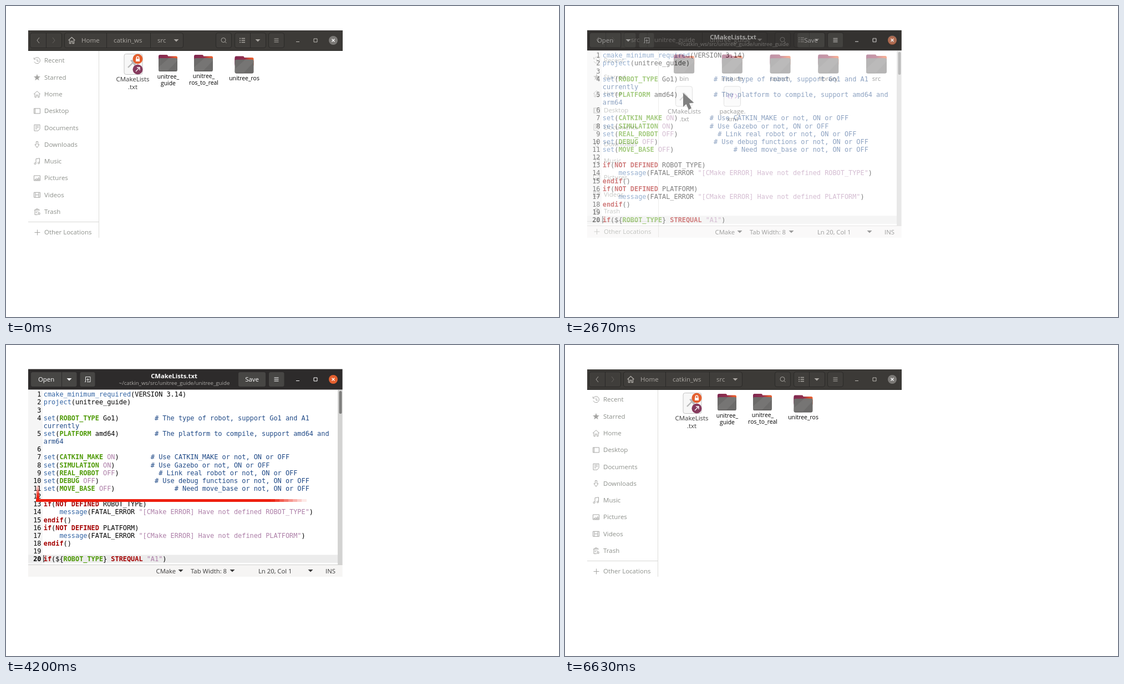
Recreate the animation shown at these times as an HTML page with a canvas. Size 997 by 561 pixels, loop 6660 ms.

```html
<!DOCTYPE html>
<html lang="en">
<head>
<meta charset="utf-8">
<title>Editing CMakeLists.txt</title>
<style>
html, body { margin: 0; width: 100%; height: 100%; overflow: hidden; background: #fff; }
canvas { display: block; }
</style>
</head>
<body>
<canvas id="stage" width="997" height="561"></canvas>
<script>
const W = 997, H = 561, LOOP = 6660, STEP = 30;
const UI = '"Open Sans", "Noto Sans", sans-serif';
const MONO = '"DejaVu Sans Mono", "Noto Sans Mono", monospace';
const stage = document.getElementById('stage').getContext('2d');
let g = stage;

// ---------- drawing helpers ----------
function rect(x, y, w, h, color) {
  g.fillStyle = color;
  g.fillRect(x, y, w, h);
}
function box(x, y, w, h, r, fill, stroke) {
  g.beginPath();
  g.roundRect(x, y, w, h, r);
  if (fill) { g.fillStyle = fill; g.fill(); }
  if (stroke) { g.strokeStyle = stroke; g.lineWidth = 1; g.stroke(); }
}
function dot(x, y, r, color) {
  g.fillStyle = color;
  g.beginPath();
  g.arc(x, y, r, 0, 7);
  g.fill();
}
// Text whose capitals are centred on y.
function text(s, x, y, color, size = 11.5, align = 'left', weight = '') {
  g.font = `${weight} ${size}px ${UI}`;
  g.textAlign = align;
  g.fillStyle = color;
  g.fillText(s, x, y + size * 0.36);
}
function icon(x, y, d, color, fill, width = 1) {
  const path = new Path2D(d);
  g.save();
  g.translate(x, y);
  g.fillStyle = g.strokeStyle = color;
  g.lineWidth = width;
  fill ? g.fill(path) : g.stroke(path);
  g.restore();
}
const arrowDown = (x, y, color) => icon(x, y, 'M-4.5-2H4.5L0 2.5Z', color, true);
const CROSS = 'M-2.5-2.5 2.5 2.5M2.5-2.5-2.5 2.5';
const HOUSE = 'M-6 0 0-5.5 6 0M-4-1V5.5H-1.5V1.5H1.5V5.5H4V-1';
const MENU = 'M-4-3H4M-4 0H4M-4 3H4';

function windowButtons(y, color, close) {
  icon(526, y, 'M-3 2.5H3', color);
  icon(558, y, 'M-3-3H3V3H-3Z', color);
  dot(590, y, 8, close);
  icon(590, y, CROSS, '#fff', false, 1.3);
}

// ---------- file manager ----------
const PLACES = [
  ['Recent', 'M-4.5-3.5A5.5 5.5 0 1 1-5 2M0-3V1H3M-5.5-5.5V-2.5H-2.5'],
  ['Starred', 'M0-6 1.5-1.8 6-1.6 2.4 1.2 3.7 5.5 0 3-3.7 5.5-2.4 1.2-6-1.6-1.5-1.8Z', true],
  ['Home', HOUSE],
  ['Desktop', 'M-5.5-4.5H5.5V4.5H-5.5ZM-3.5-4.5V4.5'],
  ['Documents', 'M-5-5.5H5V2L2 5.5H-5ZM-3-3H3M-3-.5H3M-3 2H0'],
  ['Downloads', 'M-1.5-5.5H1.5V0H4L0 5.5-4 0H-1.5Z'],
  ['Music', 'M-2 3.5V-4.5L4.5-5.5V2.5M-5 4a1.5 1.5 0 1 0 3 0 1.5 1.5 0 1 0-3 0M1.5 3a1.5 1.5 0 1 0 3 0 1.5 1.5 0 1 0-3 0'],
  ['Pictures', 'M-5.5-4.5H5.5V4.5H-5.5ZM-4 3-1 0 1 2 3-1 4 3Z'],
  ['Videos', 'M-5.5-4.5H5.5V4.5H-5.5ZM-3-4.5V4.5M3-4.5V4.5M-3 0H3'],
  ['Trash', 'M-5-3H5M-2-3V-5H2V-3M-4-3V5.5H1M-1.5-1V3M1.5-1V1M2 2H5V5H2Z']
];

function buttonGroup(left, right, dividers, y) {
  box(left + .5, y - 13.5, right - left, 27, 3.5, '#403e3b', '#2b2a28');
  for (const x of dividers) rect(x, y - 13, 1, 26, '#2b2a28');
}

function fileManager(d, crumbs) {
  const y = 62 - d, gray = '#a9a6a1';
  rect(40, 44, 567, 37 - d, '#3c3a37');
  rect(40, 80 - d, 567, 1, '#2b2a28');
  buttonGroup(43, 100 + d, [72 + d], y);
  icon(58 + d, y, 'M2-5-2 0 2 5', gray);
  icon(86 + d, y, 'M-2-5 2 0-2 5', '#66635f');
  crumbs(y, gray);
  buttonGroup(378, 406, [], y);
  icon(392.5, y, 'M-4.5-.5a4 4 0 1 0 8 0 4 4 0 1 0-8 0M2.5 2.5 5 5', gray);
  buttonGroup(412, 468, [440], y);
  icon(426, y, 'M-5-3.5H-3M-5 0H-3M-5 3.5H-3M-1.5-3.5H5M-1.5 0H5M-1.5 3.5H5', gray, false, 1.6);
  arrowDown(454, y, gray);
  buttonGroup(473, 501, [], y);
  icon(487.5, y, MENU, gray);
  windowButtons(y, '#bbb8b3', '#7b7976');

  const step = 30.27 - d * .05, top = 98.3 - d * .7;
  PLACES.forEach(([name, path, fill], i) => {
    const row = top + i * step;
    icon(56 + d, row + .3, path, '#a5a5a3', fill);
    text(name, 69 + d, row, '#8d908b');
  });
  rect(40, 389 - d, 127 + d, 1, '#d8d8d6');
  icon(56.5 + d, 408.5 - d * 1.5, 'M-5 0H5M0-5V5', '#a5a5a3');
  text('Other Locations', 69 + d, 408 - d * 1.5, '#8d908b');
  rect(167 + d, 81 - d, 1, 337, '#dcdcda');
}

function folder(x, y, w, h) {
  const l = x - w / 2, t = y - h / 2;
  const back = g.createLinearGradient(l, 0, l + w, 0);
  back.addColorStop(0, '#7f2850');
  back.addColorStop(.5, '#92304e');
  back.addColorStop(.85, '#e2562f');
  back.addColorStop(1, '#e9602f');
  box(l, t, w * .5, h * .5, 2.5, back);
  box(l, t + 2.5, w, h * .5, 2.5, back);
  g.save();
  box(l, t + h * .2, w, h * .8, 3, '#6c6b6a');
  g.clip();
  icon(l, t, `M0 ${h}V${h * .75}L${w * .75} 0H${w}V${h * .35}L${w * .45} ${h}Z`, '#767574', true);
  rect(l, t + h - 1, w, 1, '#585756');
  g.restore();
}

function page(x, y, w, h) {
  box(x - w / 2 + .5, y - h / 2 + .5, w - 1, h - 1, 3.5, '#f7f7f7', '#c4c4c4');
}
function hammer(x, y) {
  icon(x, y, 'M-7 7 3-3', '#b9b9b9', false, 2.4);
  icon(x, y, 'M-3-6 1-7 8 0 5 4Z', '#b9b9b9', true);
}
function label(x, y, lines, color = '#3b3b3b', size = 11.5, gap = 13.5) {
  lines.forEach((s, i) => text(s, x, y + i * gap, color, size, 'center'));
}

function workspaceScene() {
  fileManager(0, (y, gray) => {
    buttonGroup(105, 319, [181, 260], y);
    icon(118.5, y, HOUSE, gray, false, 1.4);
    text('Home', 136, y, gray);
    text('catkin_ws', 194, y, gray);
    text('src', 273, y, gray);
    arrowDown(307, y, gray);
  });
  page(229.5, 105, 34, 38);
  hammer(227, 104);
  dot(237.5, 95.5, 9, '#e4602f');
  icon(237.5, 95.5, 'M-2.2 0V-2a2.2 2.2 0 0 1 4.4 0V0', '#fff', false, 1.4);
  rect(234, 95, 7, 5, '#fff');
  dot(237.5, 114.5, 9, '#863b5e');
  icon(237.5, 114.5, 'M-3.5 3.5 3-3M-1.5-3.5H3.5V1.5', '#fff', false, 1.3);
  label(228.5, 132, ['CMakeLists', '.txt']);
  folder(292, 103, 34, 30);
  folder(356, 103, 34, 30);
  folder(429.5, 106, 34, 31);
  label(292.5, 127, ['unitree_', 'guide'], '#000', 10.4, 12);
  label(356.5, 126.5, ['unitree_', 'ros_to_real'], '#000', 10.4, 12);
  label(429.5, 130.5, ['unitree_ros'], '#000', 10.4);
}

function packageScene() {
  fileManager(1, (y, gray) => {
    buttonGroup(106, 364, [148, 247], y);
    text('src', 119, y, gray);
    text('unitree_guide', 161, y, gray);
    text('unitree_guide', 261, y, gray);
    arrowDown(351, y, gray);
  });
  ['bin', 'include', 'launch', 'library', 'src'].forEach((name, i) => {
    const x = 214.7 + i * 86.7;
    folder(x, 104.5, 37, 34);
    label(x, 131, [name]);
  });
  page(214.5, 163, 31, 37);
  hammer(214, 163);
  label(215, 190, ['CMakeLists', '.txt']);
  page(301.5, 163, 31, 37);
  icon(301.5, 162.5, 'M-5-4-9 0-5 4M5-4 9 0 5 4M1.8-5-1.8 5', '#b48fd0', false, 1.4);
  label(302, 190, ['package.', 'xml']);
}

// ---------- editor ----------
const CODE = `cmake_minimum_required(VERSION 3.14)
project(unitree_guide)

set(ROBOT_TYPE Go1)         # The type of robot, support Go1 and A1
currently
set(PLATFORM amd64)         # The platform to compile, support amd64 and
arm64

set(CATKIN_MAKE ON)        # Use CATKIN_MAKE or not, ON or OFF
set(SIMULATION ON)         # Use Gazebo or not, ON or OFF
set(REAL_ROBOT OFF)          # Link real robot or not, ON or OFF
set(DEBUG OFF)              # Use debug functions or not, ON or OFF
set(MOVE_BASE OFF)               # Need move_base or not, ON or OFF

if(NOT DEFINED ROBOT_TYPE)
    message(FATAL_ERROR "[CMake ERROR] Have not defined ROBOT_TYPE")
endif()
if(NOT DEFINED PLATFORM)
    message(FATAL_ERROR "[CMake ERROR] Have not defined PLATFORM")
endif()

if(\${ROBOT_TYPE} STREQUAL "A1")
    add_definitions(-DROBOT_TYPE_A1)`.split('\n');
const WRAPPED = /^(currently|arm64)$/;
// Groups: comment, value, variable, keyword, function.
const TOKENS = /(#.*|^currently|^arm64)|("[^"]*"|\b(?:ON|OFF)\b)|((?<=set\(|\{)\w+)|(\b(?:if|endif|NOT|DEFINED|STREQUAL)\b)|(\b(?:cmake_minimum_required|project|set|message|add_definitions)\b)|./g;
const COLORS = ['#204a87', '#ad7fa8', '#4e9a06', '#a40000', '#3465a4'];

function codeLines() {
  const size = 11.88, regular = `${size}px ${MONO}`, bold = 'bold ' + regular;
  let number = 0;
  g.save();
  g.beginPath();
  g.rect(40, 81, 558, 314);
  g.clip();
  CODE.forEach((line, i) => {
    const y = 93.2 + i * 14.15;
    if (!WRAPPED.test(line)) {
      number++;
      g.font = number === 20 ? bold : regular;
      g.fillStyle = '#000';
      g.textAlign = 'right';
      g.fillText(number, 63.5, y);
    }
    g.textAlign = 'left';
    g.font = regular;
    const advance = g.measureText('0').width;
    for (const m of line.matchAll(TOKENS)) {
      const kind = m.slice(1).findIndex(Boolean);
      g.font = kind === 2 || kind === 3 ? bold : regular;
      g.fillStyle = COLORS[kind] || '#000';
      g.fillText(m[0], 67.8 + m.index * advance, y);
    }
  });
  g.restore();
}

function editorScene() {
  const button = (x, w) => box(x, 49, w, 26, 3, '#474644');
  rect(40, 43.5, 566.6, 37, '#2d2b2b');
  button(45, 82.5);
  rect(100, 49, 1, 26, '#2d2b2b');
  text('Open', 58, 62, '#fff', 11.4);
  arrowDown(114, 62, '#fff');
  button(133.5, 27);
  icon(147, 62, 'M-5 4.5H-3.5V-4.5H5V4.5H2M-1 4.5H2M.5-2V3M-2 .5H3', '#e8e8e8');
  text('CMakeLists.txt', 303, 56, '#fff', 11.3, 'center', 'bold');
  text('~/catkin_ws/src/unitree_guide/unitree_guide', 303.5, 68.5, '#a8a6a3', 9.7, 'center');
  button(419, 49);
  text('Save', 443.5, 62, '#fff', 11.3, 'center');
  button(474, 27.5);
  icon(487.5, 62, MENU, '#fff');
  windowButtons(62, '#fff', '#e4602f');

  rect(40, 81, 26, 315, '#f5f5f5');
  rect(40, 378.5, 558, 14.5, '#ececec');
  codeLines();
  rect(67.5, 379, 1, 13, '#000');
  rect(598, 81, 8.6, 315, '#d3d3d2');
  box(600.5, 83, 5, 41, 2.5, '#7e7e7d');

  rect(40, 396, 566.6, 22, '#f6f5f4');
  rect(40, 396, 566.6, 1, '#d0cfcd');
  const status = (s, x) => text(s, x, 407.5, '#3b3b3b', 11.3);
  status('CMake', 270.5);
  status('Tab Width: 8', 333);
  status('Ln 20, Col 1', 455);
  status('INS', 576);
  for (const x of [315, 408, 549]) arrowDown(x, 407, '#3b3b3b');
}

function render(scene) {
  const canvas = document.createElement('canvas');
  canvas.width = W;
  canvas.height = H;
  g = canvas.getContext('2d');
  rect(0, 0, W, H, '#fff');
  scene();
  g = stage;
  return canvas;
}
const workspace = render(workspaceScene);
const packageDir = render(packageScene);
const editor = render(editorScene);

// ---------- motion ----------
const clamp = v => Math.min(1, Math.max(0, v));
const progress = (t, from, to) => clamp((t - from) / (to - from));
function fade(t, from, to) {
  const p = progress(t, from, to);
  return p * p * (3 - 2 * p);
}
function show(scene, alpha) {
  if (!alpha) return;
  g.globalAlpha = alpha;
  g.drawImage(scene, 0, 0);
  g.globalAlpha = 1;
}

const POINTER = 'M0 0V25L5.5 20 10 30 15 27.5 11 18.5 19.5 17.5Z';
function pointer(t) {
  if (t < 630) return;
  const enter = (1 - progress(t, 630, 1313)) ** 1.25;
  const move = 1 - (1 - progress(t, 1800, 2500)) ** 1.8;
  icon(297 + 350 * enter - 84 * move, 101 + 455 * enter + 56 * move, POINTER, '#000', true);
}

// Frame sides in drawing order: start point and direction.
const SIDES = [[574, 115, -520, 0], [55, 117, 0, 166], [54, 278, 520, 0], [569, 283, 0, -166]];
const SOFT = .125, STRIPS = 64, THICK = 5;
const wipe = (p, u) => clamp((clamp(p) * (1 + SOFT) - u) / SOFT);

// Each side wipes in, then wipes out while the next one wipes in.
function redFrame(t) {
  const p = (t - 2932) / 447;
  g.fillStyle = '#ee1f0f';
  SIDES.forEach(([x, y, dx, dy], k) => {
    for (let i = 0; i < STRIPS; i++) {
      const u = (i + .5) / STRIPS;
      g.globalAlpha = wipe(p - k, u) * (1 - wipe(p - k - 1, u));
      if (!g.globalAlpha) continue;
      const at = (start, d, n) => Math.round(start + d * n / STRIPS);
      const x0 = at(x, dx, i), y0 = at(y, dy, i);
      g.fillRect(x0, y0, dx ? at(x, dx, i + 1) - x0 : THICK, dy ? at(y, dy, i + 1) - y0 : THICK);
    }
  });
  g.globalAlpha = 1;
}

function draw() {
  const t = Math.floor(performance.now() % LOOP / STEP) * STEP;
  show(workspace, 1);
  show(packageDir, fade(t, 1290, 1650));
  pointer(t);
  show(editor, fade(t, 2490, 2850));
  redFrame(t);
  show(workspace, fade(t, 5730, 6640));
  requestAnimationFrame(draw);
}
draw();
</script>
</body>
</html>
```
